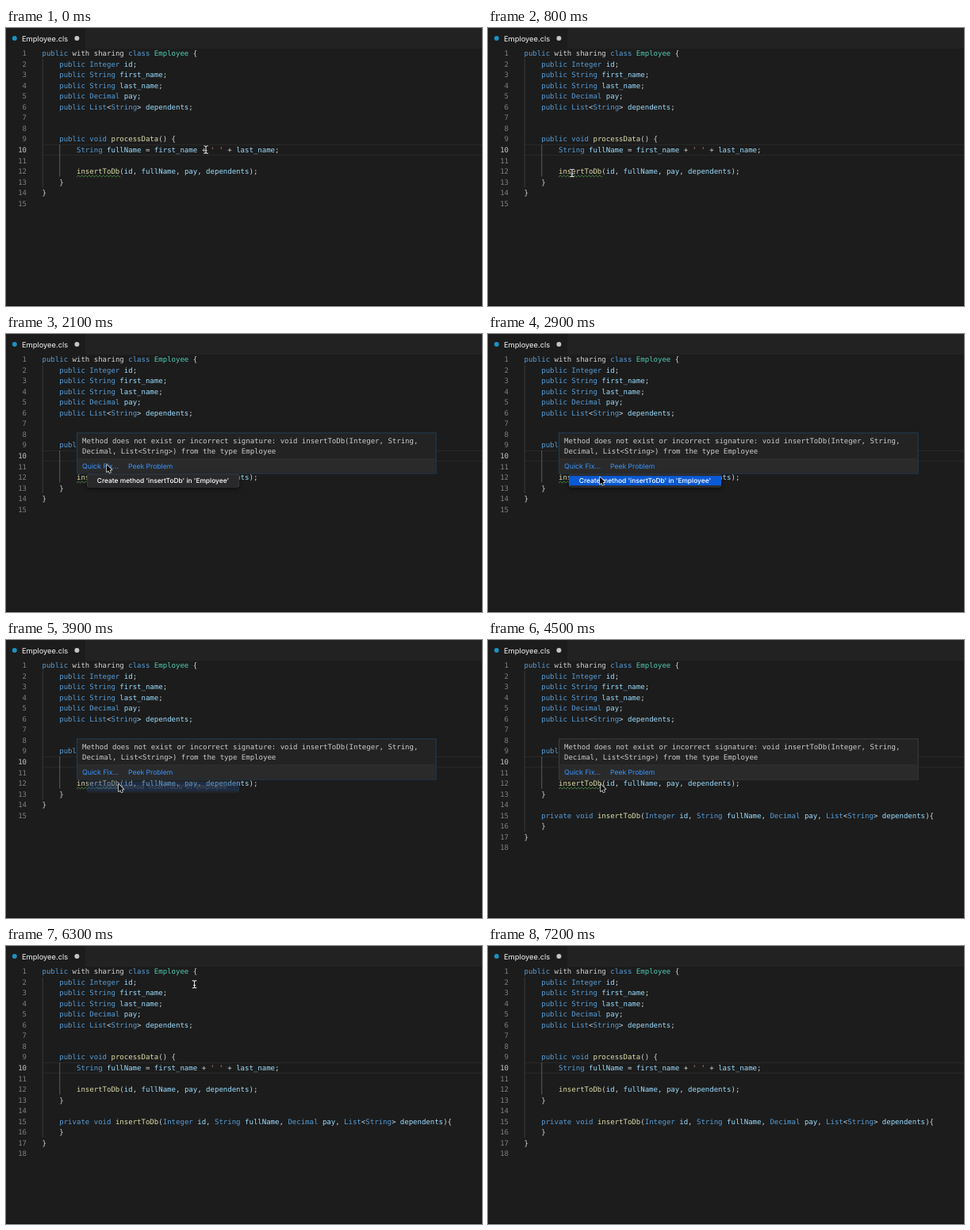
Animation, 600 px wide and 351 px high, one loop 7.3 s. Source, as an HTML page with a canvas:

```html
<!DOCTYPE html>
<html lang="en">
<head>
<meta charset="utf-8">
<title>Quick fix</title>
<style>
html, body { margin: 0; width: 100%; height: 100%; overflow: hidden; background: #1c1c1c; }
canvas { display: block; width: 600px; height: 351px; }
</style>
</head>
<body>
<canvas id="stage"></canvas>
<script>
const W = 600, H = 351, LOOP = 7300, STEP = 100;
const CODE_SIZE = 9.03, CHAR = 5.437, LINE = 13.53, LEFT = 45.5, BASE = 35.2;
const MONO = `${CODE_SIZE}px "DejaVu Sans Mono", monospace`;
const ui = (size, weight = 400) => `${weight} ${size}px Inter, sans-serif`;

const AT = { hover: 1100, menu: 2000, pick: 2600, fade: 3700, edit: 4000, blur: 4200, fixed: 4600, close: 4900 };

const canvas = document.getElementById('stage');
const ctx = canvas.getContext('2d');
const ratio = window.devicePixelRatio || 1;
canvas.width = W * ratio;
canvas.height = H * ratio;
ctx.scale(ratio, ratio);
ctx.textRendering = 'geometricPrecision';

const head = `public with sharing class Employee {
    public Integer id;
    public String first_name;
    public String last_name;
    public Decimal pay;
    public List<String> dependents;


    public void processData() {
        String fullName = first_name + ' ' + last_name;

        insertToDb(id, fullName, pay, dependents);
    }`;
const method = `
    private void insertToDb(Integer id, String fullName, Decimal pay, List<String> dependents){
    }`;
const before = (head + '\n}\n').split('\n');
const after = (head + '\n' + method + '\n}\n').split('\n');

const keywords = new Set('public private class void Integer String Decimal List'.split(' '));

function tokenColor(word, next) {
  if (word[0] === "'") return '#ce9178';
  if (!/\w/.test(word) || word === 'with' || word === 'sharing') return '#d4d4d4';
  if (keywords.has(word)) return '#569cd6';
  if (word === 'Employee') return '#4ec9b0';
  return next === '(' ? '#dcdcaa' : '#9cdcfe';
}

function rect(x, y, w, h, color) {
  ctx.fillStyle = color;
  ctx.fillRect(x, y, w, h);
}

function text(str, x, y, font, color, align = 'left') {
  ctx.font = font;
  ctx.fillStyle = color;
  ctx.textAlign = align;
  ctx.fillText(str, x, y);
}

function disc(x, y, r, color) {
  ctx.fillStyle = color;
  ctx.beginPath();
  ctx.arc(x, y, r, 0, Math.PI * 2);
  ctx.fill();
}

function roundBox(x, y, w, h, r, color) {
  ctx.fillStyle = color;
  ctx.beginPath();
  ctx.roundRect(x, y, w, h, r);
  ctx.fill();
}

function drawFrame() {
  rect(0, 0, W, H, '#1c1c1c');
  rect(100, 0, W - 100, 26, '#222223');
  rect(0, 350, W, 1, '#121212');
  disc(10.8, 13, 3, '#1e90bf');
  text('Employee.cls', 20, 16.6, ui(9.3), '#f4f4f4');
  disc(89.4, 13, 3, '#c5c5c5');
}

function drawCode(lines, squiggle) {
  rect(LEFT, 147, W - LEFT, 1, '#282828');
  rect(LEFT, 160, W - LEFT, 1, '#282828');
  rect(45.8, 39, 0.8, (lines.length - 3) * LINE, '#404040');
  rect(67.4, 147, 0.8, 3 * LINE, '#6a6a6a');
  lines.forEach((line, row) => {
    const y = BASE + row * LINE;
    text(row + 1, 26, y, MONO, row === 9 ? '#c6c6c6' : '#7e7e7e', 'right');
    for (const m of line.matchAll(/'[^']*'|\w+|[^\w\s]/g)) {
      const next = line[m.index + m[0].length];
      text(m[0], LEFT + m.index * CHAR, y, MONO, tokenColor(m[0], next));
    }
  });
  if (squiggle) {
    ctx.strokeStyle = '#4f9a4a';
    ctx.lineWidth = 0.9;
    ctx.beginPath();
    for (let x = 89; x <= 144; x += 0.5) ctx.lineTo(x, 187 + 0.95 * Math.cos((x - 89) * Math.PI / 2.25));
    ctx.stroke();
  }
}

function drawHover(focused) {
  rect(89, 124.5, 453.5, 52, focused ? '#214764' : '#454545');
  rect(89.8, 125.3, 451.9, 50.4, '#232324');
  rect(89.8, 158, 451.9, 17.7, '#2a2a2b');
  rect(89.8, 157.6, 451.9, 0.7, '#373737');
  text('Method does not exist or incorrect signature: void insertToDb(Integer, String,', 96, 138, MONO, '#cccccc');
  text('Decimal, List<String>) from the type Employee', 96, 151, MONO, '#cccccc');
  text('Quick Fix…', 96, 170.2, ui(8.8), '#3794ff');
  text('Peek Problem', 154, 170.2, ui(8.6), '#3794ff');
}

function drawMenu(picked, alpha) {
  ctx.save();
  ctx.globalAlpha = alpha;
  ctx.shadowColor = 'rgba(0,0,0,.5)';
  ctx.shadowBlur = 5 * ratio;
  ctx.shadowOffsetY = 2 * ratio;
  roundBox(102, 176.8, 192, 16.6, 3, '#4a4a4c');
  ctx.shadowColor = 'transparent';
  roundBox(102.5, 177.3, 191, 15.6, 2.6, '#29292b');
  if (picked) rect(102, 179.2, 192, 12, '#0a5ad6');
  text("Create method 'insertToDb' in 'Employee'", 114.8, 188.2, ui(8.4, 500), '#ffffff');
  ctx.restore();
}

// Pointer keys: time, x, y
const path = [
  [0, 252, 153.5], [100, 252, 153.5], [700, 106, 183], [900, 106, 183], [1200, 127, 181],
  [1600, 127, 181], [1900, 127, 165], [2300, 127, 165], [2700, 141, 180.5], [3300, 141, 180.5],
  [3600, 142, 182], [4500, 142, 182], [5100, 144, 241], [5700, 144, 241],
  [6400, 243, 37], [6800, 274, -12], [LOOP, 274, -12]
];

function pointerAt(t) {
  const i = path.findIndex(key => key[0] > t);
  const [t0, x0, y0] = path[i - 1], [t1, x1, y1] = path[i];
  const p = (t - t0) / (t1 - t0), e = p * p * (3 - 2 * p);
  return [x0 + (x1 - x0) * e, y0 + (y1 - y0) * e];
}

function drawArrow(x, y) {
  ctx.beginPath();
  [[0, 0], [0, 9.2], [2.1, 7.3], [3.5, 10.4], [5, 9.7], [3.7, 6.8], [6.5, 6.6]]
    .forEach(([dx, dy]) => ctx.lineTo(x + dx, y + dy));
  ctx.closePath();
  ctx.lineWidth = 1.4;
  ctx.lineJoin = 'round';
  ctx.strokeStyle = '#f2f2f2';
  ctx.stroke();
  ctx.fillStyle = '#080808';
  ctx.fill();
}

function drawBeam(x, y) {
  for (const [width, color] of [[2.4, '#111111'], [1.1, '#e6e6e6']]) {
    ctx.strokeStyle = color;
    ctx.lineWidth = width;
    ctx.beginPath();
    for (const s of [-1, 1]) {
      ctx.moveTo(x - 2.8, y + s * 4.7);
      ctx.quadraticCurveTo(x, y + s * 4.7, x, y + s * 3.4);
      ctx.quadraticCurveTo(x, y + s * 4.7, x + 2.8, y + s * 4.7);
    }
    ctx.moveTo(x, y - 3.6);
    ctx.lineTo(x, y + 3.6);
    ctx.moveTo(x - 1.5, y + 1.2);
    ctx.lineTo(x + 1.5, y + 1.2);
    ctx.stroke();
  }
}

function render(t) {
  drawFrame();
  drawCode(t < AT.edit ? before : after, t < AT.fixed);
  if (t >= AT.hover && t < AT.close) drawHover(t >= AT.menu && t < AT.blur);
  if (t >= AT.menu && t < AT.edit) {
    const alpha = t < AT.fade ? 1 : [0.8, 0.45, 0.16][(t - AT.fade) / STEP];
    drawMenu(t >= AT.pick, alpha);
  }
  const [x, y] = pointerAt(t);
  const onWidget = t >= 1700 && t <= 4600 && (t >= AT.menu || y < 176);
  (onWidget || y < 26 ? drawArrow : drawBeam)(x, y);
}

function tick() {
  const t = performance.now() % LOOP;
  render(Math.floor(t / STEP) * STEP);
  requestAnimationFrame(tick);
}
tick();
</script>
</body>
</html>
```
